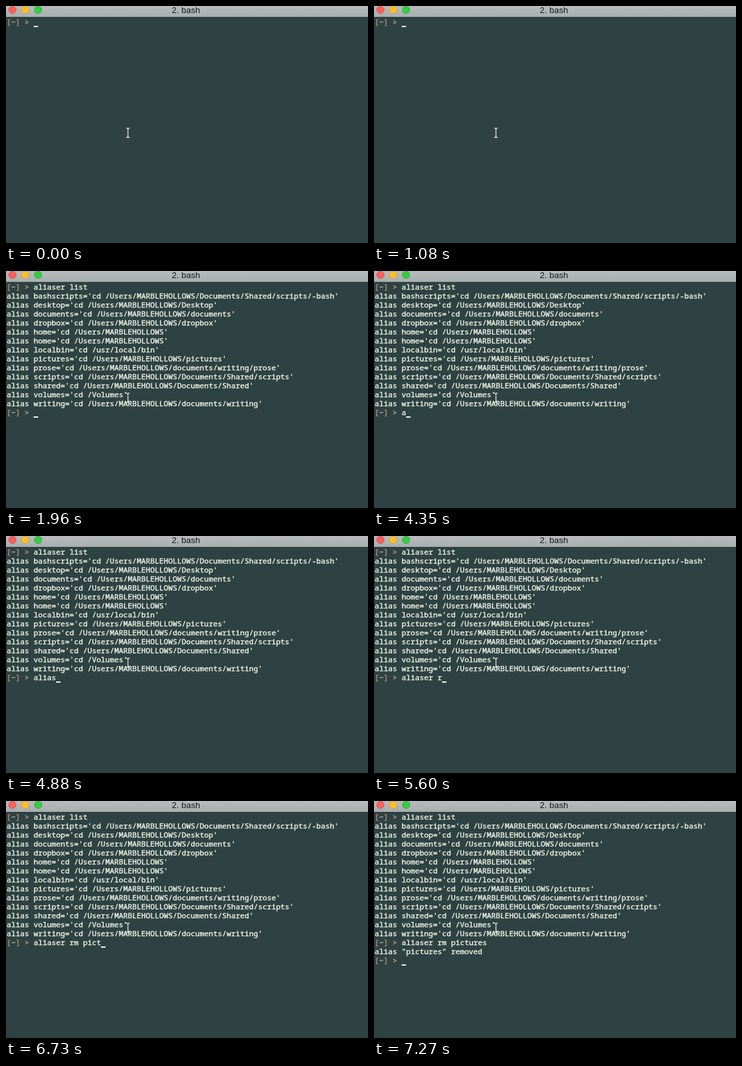
Write an HTML page that moves like this. It is 564 by 370 pixels and loops after 8 s.

```html
<!DOCTYPE html>
<html lang="en">
<head>
<meta charset="utf-8">
<title>Terminal</title>
<style>
html, body { margin: 0; width: 100%; height: 100%; overflow: hidden; background: #2f4243; }
svg { display: block; }
text { white-space: pre; }
.term {
  font: 500 11.667px "Noto Sans Mono", "DejaVu Sans Mono", monospace;
  font-variant-ligatures: none;
  color: #eef6e6;
}
.term text { fill: currentColor; stroke: currentColor; stroke-width: .4px; }
.title { font: 13.5px "Liberation Sans", Arial, sans-serif; fill: #141818; }
.bracket { color: #c08a68; }
.tilde { color: #a6b8b0; }
.arrow { color: #b3a794; }
</style>
</head>
<body>
<svg width="564" height="370" viewBox="0 0 564 370">
  <defs>
    <linearGradient id="bar" x2="0" y2="1">
      <stop offset="0" stop-color="#b6bcbb"/>
      <stop offset="1" stop-color="#a8afae"/>
    </linearGradient>
  </defs>
  <rect width="564" height="370" fill="#2f4243"/>
  <rect width="564" height="17" fill="url(#bar)"/>
  <g stroke-width=".8">
    <circle cx="10" cy="6" r="5.8" fill="#fb615b" stroke="#dc4a45"/>
    <circle cx="30" cy="6" r="5.8" fill="#fcbd2e" stroke="#dc9f25"/>
    <circle cx="50" cy="6" r="5.8" fill="#35cb42" stroke="#27a734"/>
  </g>
  <text class="title" x="280.5" y="11" text-anchor="middle">2. bash</text>
  <g id="screen" class="term"></g>
  <rect id="caret" width="7" height="2" fill="#f2f8f0"/>
  <path d="M187.5 190.5Q190 190.5 190 193V203Q190 205.5 187.5 205.5M192.5 190.5Q190 190.5 190 193M190 203Q190 205.5 192.5 205.5"
    fill="none" stroke="#eef4ee" stroke-width="1.2" stroke-linecap="round"/>
</svg>
<script>
const LOOP = 8000, CELL = 7, ROW = 14, LEFT = 1, BASE = 29;
const home = "/Users/MARBLEHOLLOWS";

const aliases = [
  ["bashscripts", home + "/Documents/Shared/scripts/-bash"],
  ["desktop", home + "/Desktop"],
  ["documents", home + "/documents"],
  ["dropbox", home + "/dropbox"],
  ["home", home],
  ["home", home],
  ["localbin", "/usr/local/bin"],
  ["pictures", home + "/pictures"],
  ["prose", home + "/documents/writing/prose"],
  ["scripts", home + "/Documents/Shared/scripts"],
  ["shared", home + "/Documents/Shared"],
  ["volumes", "/Volumes"],
  ["writing", home + "/documents/writing"]
];

// time, number of characters typed
const listCmd = "aliaser list";
const listKeys = [[1310, 2], [1430, 5], [1550, 7], [1720, 9], [1780, 10], [1840, 12]];
const listDone = 1960;

const rmCmd = "aliaser rm pictures";
const rmKeys = [
  [4350, 1], [4470, 2], [4650, 3], [4700, 4],
  [4880, 5], [4980, 6], [5080, 7], [5180, 8],
  [5600, 9], [5720, 10], [5840, 11], [6200, 12],
  [6370, 13], [6490, 14], [6730, 15], [6790, 16],
  [6910, 18], [7090, 19]
];
const rmDone = 7270;
const blink = [960, 1080];

const NS = "http://www.w3.org/2000/svg";
const screen = document.getElementById("screen");
const caret = document.getElementById("caret");

function addText(parent, col, row, str, cls) {
  const el = document.createElementNS(NS, "text");
  el.setAttribute("x", LEFT + col * CELL);
  el.setAttribute("y", BASE + row * ROW);
  if (cls) el.setAttribute("class", cls);
  el.textContent = str;
  parent.append(el);
  return el;
}

function addGroup() {
  const g = document.createElementNS(NS, "g");
  screen.append(g);
  return g;
}

function addPrompt(parent, row) {
  addText(parent, 0, row, "[", "bracket");
  addText(parent, 1, row, "~", "tilde");
  addText(parent, 2, row, "]", "bracket");
  addText(parent, 4, row, ">", "arrow");
  return addText(parent, 6, row, "");
}

const first = addPrompt(screen, 0);
const listing = addGroup();
aliases.forEach(([name, path], i) =>
  addText(listing, 0, i + 1, `alias ${name}='cd ${path}'`));
const second = addPrompt(listing, 14);
const result = addGroup();
addText(result, 0, 15, 'alias "pictures" removed');
addPrompt(result, 16);

function typed(keys, t) {
  let n = 0;
  for (const [at, count] of keys) if (t >= at) n = count;
  return n;
}

function show(el, on) {
  el.setAttribute("visibility", on ? "visible" : "hidden");
}

function draw(t) {
  const a = typed(listKeys, t), b = typed(rmKeys, t);
  first.textContent = listCmd.slice(0, a);
  second.textContent = rmCmd.slice(0, b);
  show(listing, t >= listDone);
  show(result, t >= rmDone);
  const [row, col] = t >= rmDone ? [16, 0] : t >= listDone ? [14, b] : [0, a];
  caret.setAttribute("x", LEFT + (6 + col) * CELL);
  caret.setAttribute("y", BASE + 2 + row * ROW);
  show(caret, t < blink[0] || t >= blink[1]);
}

function tick() {
  draw(performance.now() % LOOP);
  requestAnimationFrame(tick);
}
tick();
</script>
</body>
</html>
```
